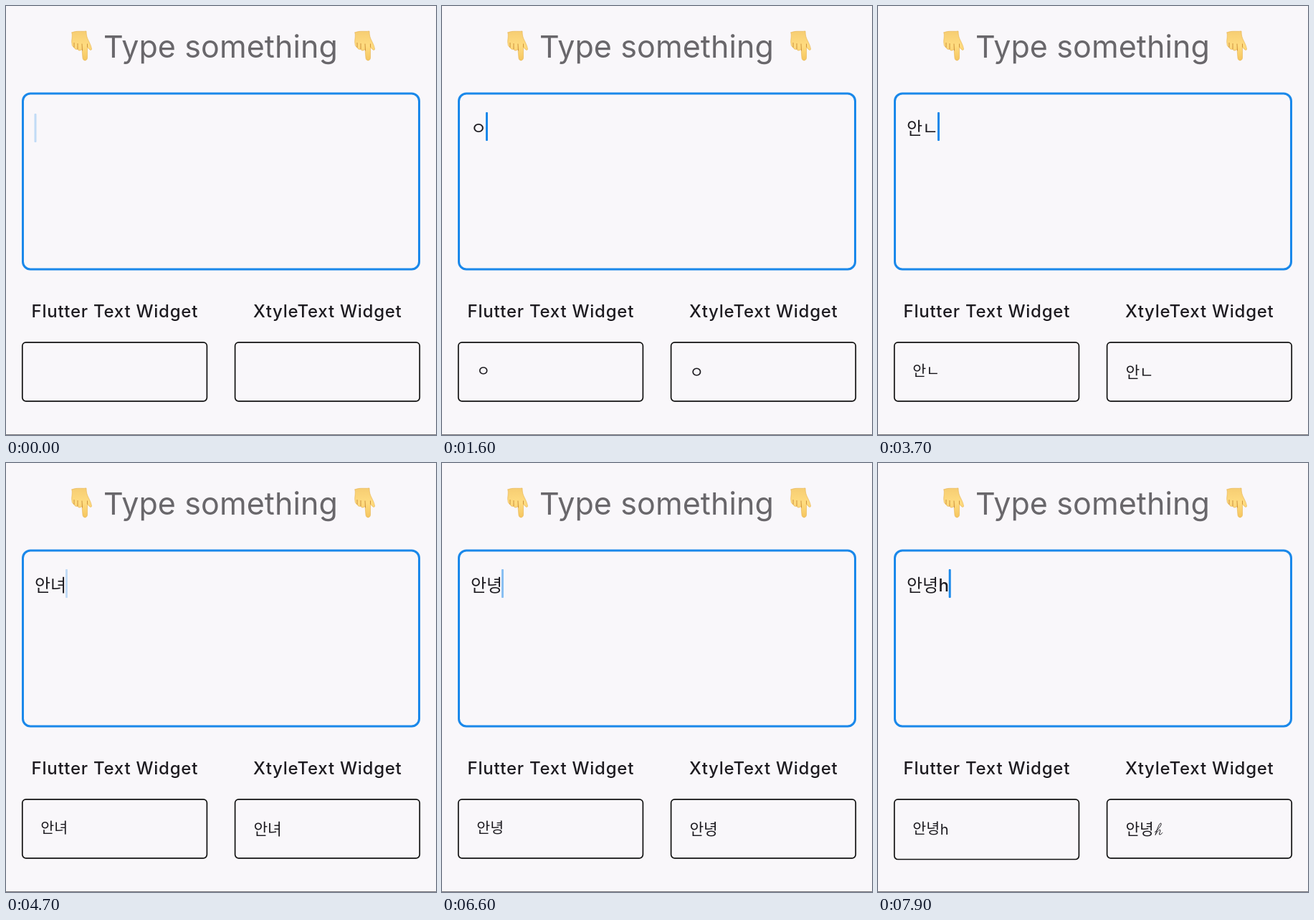
An HTML page that plays this animation: 600 by 598 pixels, repeating every 8000 ms.

```html
<!DOCTYPE html>
<html lang="en">
<head>
<meta charset="utf-8">
<title>Type something</title>
<style>
  html, body { margin: 0; width: 100%; height: 100%; overflow: hidden; background: #f9f7fa; }
  svg { display: block; width: 100%; height: 100%; }
  text { font-family: Inter, "Noto Sans CJK KR", "Noto Sans CJK", sans-serif; fill: #1d1b20; white-space: pre; }
  .title { font-size: 43px; fill: #69676b; letter-spacing: .1px; text-anchor: middle; }
  .label { font-size: 24px; font-weight: 500; letter-spacing: .75px; text-anchor: middle; }
  .hangul { font-family: "Noto Sans CJK KR", "Noto Sans CJK", sans-serif; }
  .box { fill: none; stroke: #111; stroke-width: 1.7; }
</style>
</head>
<body>
<svg viewBox="0 0 600 598">
  <defs>
    <linearGradient id="skin" x2="0" y2="1">
      <stop offset="0" stop-color="#f6cd72"/>
      <stop offset=".5" stop-color="#ffdc80"/>
      <stop offset="1" stop-color="#f5c55e"/>
    </linearGradient>
    <g id="hand" stroke-linecap="round">
      <path fill="url(#skin)" stroke="#e6b04c" stroke-width=".6" d="M2 3C8 0 16 2 22 1C22 7 23 10 25 14C27 18 29 22 29.5 26C29 29 26 27 23.5 23V38.5C23 43 17.5 43 17 38.5L16 26C14 29 10.5 28.5 10 26C8 27 5.5 26 5 23.5C3 23 2 21 2 18.5C1 14 3 10 2 3Z"/>
      <path fill="none" stroke="#c98a35" stroke-width=".9" d="M5 17.5V23.5M10 18.5V26M16 19L16.5 28M23.5 19V23"/>
    </g>
  </defs>

  <use href="#hand" x="90" y="34"/>
  <use href="#hand" x="485" y="34"/>
  <text class="title" x="299.5" y="71.5">Type something</text>

  <rect x="23.5" y="122" width="553" height="245" rx="10.5" fill="none" stroke="#1a88ea" stroke-width="3"/>
  <text class="hangul" id="input" x="40" y="179" font-size="24"></text>
  <text id="inputLatin" x="84.5" y="179" font-size="24" font-weight="500">h</text>
  <rect id="cursor" width="3" height="40" rx="1" fill="#1a88ea"/>

  <text class="label" x="151.8" y="434">Flutter Text Widget</text>
  <text class="label" x="448.8" y="434">XtyleText Widget</text>

  <rect class="box" id="plainBox" x="22.8" y="468.8" width="257.6" rx="5"/>
  <rect class="box" x="319.6" y="468.8" width="257.6" height="82" rx="5"/>
  <text class="hangul" id="plain" x="48.3" font-size="20.6"></text>
  <text id="plainLatin" x="86.8" y="517.5" font-size="20">h</text>
  <text class="hangul" id="styled" x="345.4" y="517.6" font-size="21.4"></text>
  <path id="script" fill="none" stroke="#1d1b20" stroke-linecap="round" d="M386.5 514.5C391 511 396.5 504 395 502.3C392.5 501 389.5 511 387 518.5C389 514 392.5 510.5 393.8 511.5C394.8 513 391.3 517.5 392.8 518C394 518.3 395.5 517 396.8 515.5"/>

  <rect y="597" width="600" height="1" fill="#77757a"/>
</svg>
<script>
const LOOP = 8000, STEP = 100;

// Time of each key press, composed Hangul, cursor x, whether the Latin letter follows.
const keys = [
  { at: -900, hangul: "", x: 39.5 },
  { at: 1300, hangul: "ㅇ", x: 61 },
  { at: 1900, hangul: "아", x: 61 },
  { at: 2500, hangul: "안", x: 61 },
  { at: 3300, hangul: "안ㄴ", x: 83 },
  { at: 4075, hangul: "안녀", x: 83 },
  { at: 5010, hangul: "안녕", x: 83 },
  { at: 7400, hangul: "안녕", x: 98.7, latin: true },
];

const el = id => document.getElementById(id);
const set = (id, attrs) => {
  for (const name in attrs) el(id).setAttribute(name, attrs[name]);
};

// Solid for half a second, then fades out and back in by quarters.
function cursorAlpha(elapsed) {
  const phase = elapsed % 1000;
  if (phase < 537.5) return 1;
  if (phase < 850) return Math.max(0, 0.75 - Math.floor((phase - 537.5) / 37.5) / 4);
  return Math.floor((phase - 850) / 37.5) / 4;
}

function draw(time) {
  const key = keys.findLast(k => k.at <= time);
  for (const id of ["input", "plain", "styled"]) el(id).textContent = key.hangul;
  const visibility = key.latin ? "visible" : "hidden";
  for (const id of ["inputLatin", "plainLatin", "script"]) set(id, { visibility });
  set("plain", { y: key.latin ? 517.3 : 515.5 });
  set("plainBox", { height: key.latin ? 83.7 : 82 });
  set("cursor", { x: key.x, y: key.hangul ? 148 : 150, opacity: cursorAlpha(time - key.at) });
}

const start = performance.now();
function tick() {
  const time = (performance.now() - start) % LOOP;
  draw(Math.floor(time / STEP) * STEP);
  requestAnimationFrame(tick);
}
tick();
</script>
</body>
</html>
```
